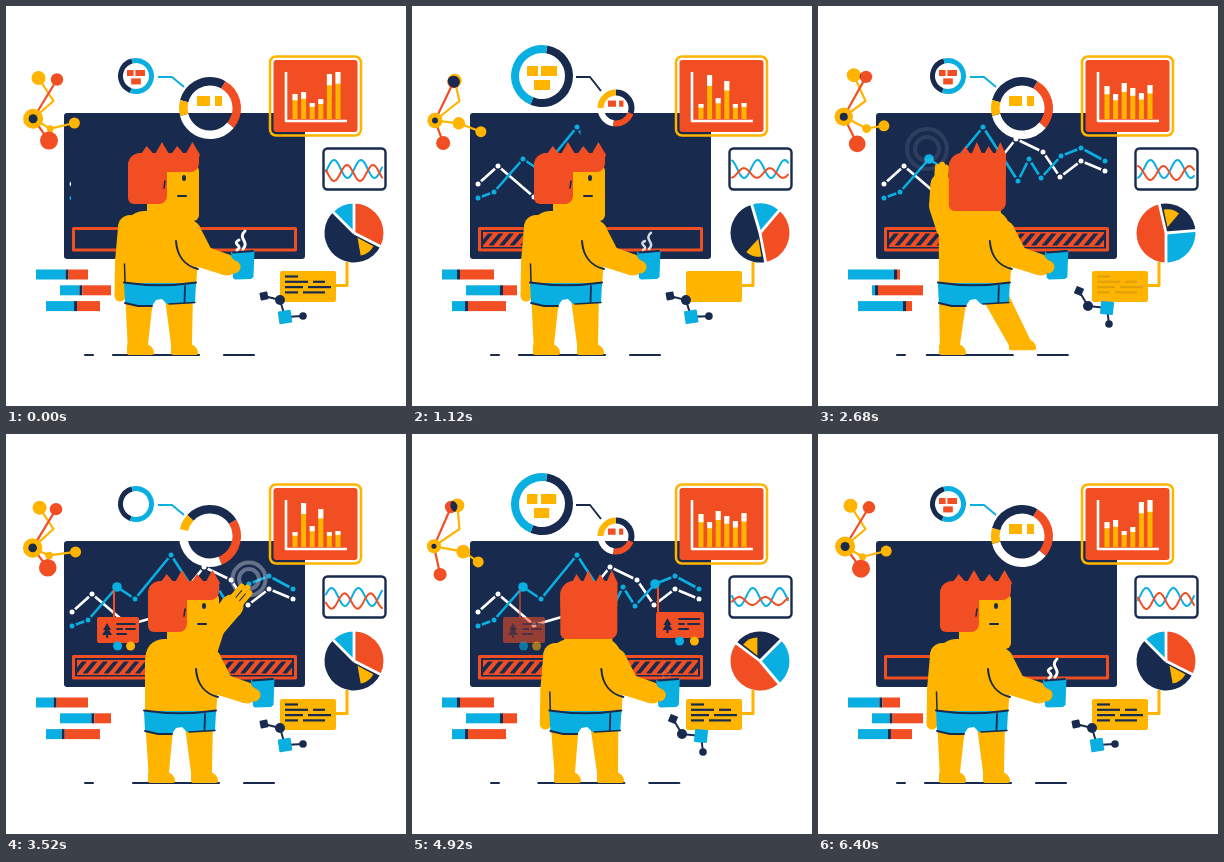
Write an HTML page with a canvas that moves like this. It is 400 by 400 pixels and loops after 6440 ms.

```html
<!DOCTYPE html>
<html lang="en">
<head>
<meta charset="utf-8">
<title>Dashboard</title>
<style>
html, body { margin: 0; width: 100%; height: 100%; overflow: hidden; background: #fff; }
canvas { display: block; width: 400px; height: 400px; }
</style>
</head>
<body>
<canvas id="stage"></canvas>
<script>
const LOOP = 6440, HALF = LOOP / 2, STEP = 40, TAU = Math.PI * 2;
const NAVY = '#182a4d', RED = '#f24e24', GOLD = '#ffb400', BLUE = '#0aafe2', WHITE = '#fff';
const canvas = document.getElementById('stage');
const dpr = window.devicePixelRatio || 1;
canvas.width = canvas.height = 400 * dpr;
const c = canvas.getContext('2d');

// ---------- timing ----------
const mix = (a, b, k) => a + (b - a) * k;
const mixAll = (a, b, k) => a.map((v, i) => Array.isArray(v) ? mixAll(v, b[i], k) : mix(v, b[i], k));
const unit = k => Math.max(0, Math.min(1, k));
const linear = (t, a, b) => unit((t - a) / (b - a));
// Eased 0 to 1 between times a and b.
const ramp = (t, a, b) => {
  const k = linear(t, a, b);
  return k * k * (3 - 2 * k);
};
const pulse = (t, a, b, d, e) => ramp(t, a, b) - ramp(t, d, e);
// Steps through states; each move is given by its start, its end and the state reached.
const moves = (t, first, list) =>
  list.reduce((state, [a, b, next]) => mixAll(state, next, ramp(t, a, b)), first);

// ---------- drawing ----------
function path(pts, close) {
  c.beginPath();
  pts.forEach(([x, y], i) => i ? c.lineTo(x, y) : c.moveTo(x, y));
  if (close) c.closePath();
}
function line(pts, color, width) {
  path(pts);
  c.strokeStyle = color;
  c.lineWidth = width;
  c.stroke();
}
function poly(pts, color) {
  path(pts, true);
  c.fillStyle = color;
  c.fill();
}
function rect(x, y, w, h, color) {
  c.fillStyle = color;
  c.fillRect(x, y, w, h);
}
function round(x, y, w, h, r, fill, stroke, width) {
  c.beginPath();
  c.roundRect(x, y, w, h, r);
  if (fill) { c.fillStyle = fill; c.fill(); }
  if (stroke) { c.strokeStyle = stroke; c.lineWidth = width; c.stroke(); }
}
function dot(x, y, r, color) {
  c.beginPath();
  c.arc(x, y, r, 0, TAU);
  c.fillStyle = color;
  c.fill();
}
function layer(alpha, draw) {
  if (alpha <= 0) return;
  c.save();
  c.globalAlpha *= alpha;
  draw();
  c.restore();
}
// Degrees run clockwise from the top.
const rad = deg => (deg - 90) * Math.PI / 180;
function arc(x, y, r, from, sweep, color, width) {
  c.beginPath();
  c.arc(x, y, r, rad(from), rad(from + sweep));
  c.strokeStyle = color;
  c.lineWidth = width;
  c.stroke();
}
function wedge(x, y, r, from, to, color) {
  c.beginPath();
  c.moveTo(x, y);
  c.arc(x, y, r, rad(from), rad(to));
  c.closePath();
  c.fillStyle = color;
  c.fill();
}
function limb(joints, color) {
  joints.forEach(([x, y, r], i) => {
    dot(x, y, r, color);
    if (!i) return;
    const [px, py, pr] = joints[i - 1];
    const d = Math.hypot(x - px, y - py) || 1;
    const nx = (py - y) / d, ny = (x - px) / d;
    poly([[px + nx * pr, py + ny * pr], [x + nx * r, y + ny * r],
      [x - nx * r, y - ny * r], [px - nx * pr, py - ny * pr]], color);
  });
}

// ---------- screen ----------
const blueLine = [[66, 192], [82, 186], [111, 153], [129, 165], [165, 121], [200, 175],
  [211, 153], [223, 172], [243, 150], [263, 142], [287, 155]];
const whiteLine = [[66, 178], [86, 160], [122, 191], [160, 180], [198, 133], [225, 146],
  [242, 171], [263, 155], [287, 165]];

function plot(pts, color) {
  line(pts, color, 2.6);
  for (const [x, y] of pts) {
    dot(x, y, 4.2, NAVY);
    dot(x, y, 2.5, color);
  }
}
function tip(x, y, left, top, w, alpha) {
  layer(alpha, () => {
    line([[x, y + 4], [x, top]], RED, 2);
    round(left, top, w, 26, 2, RED);
    dot(left + w * .49, top + 29, 4.5, BLUE);
    dot(left + w * .8, top + 29, 4.5, GOLD);
    const tx = left + w * .24, ty = top + 6;
    for (const i of [0, 1])
      poly([[tx, ty + 4 * i], [tx + 4 + i, ty + 7 + 5 * i], [tx - 4 - i, ty + 7 + 5 * i]], NAVY);
    rect(tx - 1, ty + 12, 2, 3, NAVY);
    const lx = left + w * .48, rx = left + w * .9;
    line([[lx, top + 7], [rx, top + 7]], NAVY, 2);
    line([[lx, top + 12], [lx + 5, top + 12]], NAVY, 2);
    line([[lx + 9, top + 12], [rx, top + 12]], NAVY, 2);
    line([[lx, top + 17], [lx + 9, top + 17]], NAVY, 2);
  });
}
function ripple(x, y, start, t) {
  const k = (t - start) / 340;
  if (k <= 0 || k >= 1) return;
  layer(.6 * (1 - k), () => {
    for (const r of [20, 12]) arc(x, y, r * Math.min(1, .65 + k * .5), 0, 360, '#dfe3ea', 4);
  });
}
function screen(t) {
  round(58, 107, 241, 146, 3, NAVY);
  c.strokeStyle = RED;
  c.lineWidth = 3;
  c.strokeRect(67.5, 222.5, 222, 21.5);

  c.save();
  c.beginPath();
  c.rect(71, 225, 215 * (linear(t, 480, 1780) - ramp(t, 5400, 5960)), 17);
  c.clip();
  rect(71, 226, 215, 15, RED);
  for (let x = 66; x < 290; x += 10.5)
    poly([[x, 239.5], [x + 5, 239.5], [x + 15, 227.5], [x + 10, 227.5]], NAVY);
  c.restore();

  layer(1 - ramp(t, 5400, 5800), () => {
    c.beginPath();
    c.rect(58, 107, 7 + 230 * linear(t, 580, 1780), 146);
    c.clip();
    plot(whiteLine, WHITE);
    plot(blueLine, BLUE);
    if (t > 2560) dot(111, 153, 4.8, BLUE);
    if (t > 3560) dot(243, 150, 4.8, BLUE);
  });
  tip(108, 153, 91, 183, 42, pulse(t, 2780, 2980, 4820, 5040));
  tip(246, 150, 244, 178, 48, pulse(t, 3640, 3860, 5280, 5500));
  ripple(109, 143, 2400, t);
  ripple(243, 145, 3400, t);
}

// ---------- widgets around the screen ----------
function ring(x, y, r, width, from, parts) {
  for (const [color, sweep] of parts) {
    arc(x, y, r - width / 2, from, sweep, color, width);
    from += sweep;
  }
}
function donuts(p) {
  const out = ramp(p, 420, 820), back = ramp(p, 2080, 2480), s = out - back;
  const show = 1 - pulse(p, 100, 280, 820, 1050) - pulse(p, 1660, 1960, 2440, 2640);
  const swap = (a, b) => mix(a, b, s);
  const navy = swap(145, 192);
  ring(130, 70, swap(18, 31), swap(5, 8), 200 + 170 * out + 190 * back, [[NAVY, navy], [BLUE, 360 - navy]]);
  ring(204, 102, swap(31, 18.5), swap(8.5, 6), 285 + 75 * ramp(p, 60, 640) + 285 * back,
    [[NAVY, swap(105, 110)], [RED, swap(100, 80)], [WHITE, swap(125, 80)], [GOLD, swap(30, 90)]]);
  line([[swap(152, 164), 71], [swap(166, 178), 71], [swap(178, 189), swap(81, 85)]], s > .5 ? NAVY : BLUE, 2);

  const block = (x, y, k, color, list) => {
    for (const [bx, by, w] of list) rect(x + bx * k, y + by * k, w * k * show, 10 * k, color);
  };
  block(130, 70, swap(.6, 1), s > .5 ? GOLD : RED, [[-15, -10, 11], [-1, -10, 16], [-8, 4, 16]]);
  block(204, 102, swap(1, .62), s > .5 ? RED : GOLD, [[-13, -12, 13], [5, -12, 7]]);
}
function barCard(t) {
  round(264, 50.5, 91, 79, 6, null, GOLD, 2.5);
  round(267.5, 54, 84, 72, 3, RED);
  line([[280, 66], [280, 115], [341, 115]], WHITE, 2.6);
  const rise = [25, 27, 16, 20, 45, 47], flat = [33, 25, 36, 31, 26, 34], peak = [15, 44, 21, 38, 15, 16];
  const bars = moves(t % (LOOP / 3), rise, [[120, 440, flat], [760, 1060, peak], [1480, 1880, rise]]);
  bars.forEach((h, i) => {
    const x = 286.5 + 8.6 * i;
    rect(x, 113 - h, 5, h, GOLD);
    rect(x, 113 - h, 5, h * .25, WHITE);
  });
}
function waveCard(p) {
  round(317.5, 142.5, 62, 41, 4, WHITE, NAVY, 2.4);
  const turn = p / HALF;
  const wave = (mid, amp, crest, len, color) => {
    const pts = [];
    for (let x = 320; x <= 376; x++)
      pts.push([x, mid - amp * Math.cos(TAU * ((x - crest) / len + turn))]);
    line(pts, color, 2);
  };
  wave(163, 9, 328, 27, BLUE);
  wave(167, 6 + 2 * Math.cos(TAU * turn), 341, 26, RED);
}
function pie(p) {
  const x = 348, y = 227;
  const grow = 50 * pulse(p, 900, 1600, 2680, 3140);
  const blue = -45 + 90 * ramp(p, 800, 1650) + 40 * ramp(p, 2080, 2680) + 230 * ramp(p, 2680, 3140);
  const red = blue + 45 + grow, navy = red + 117 + grow;
  wedge(x, y, 29.5, blue, red, BLUE);
  wedge(x, y, 29.5, red, navy, RED);
  wedge(x, y, 29.5, navy, blue + 360, NAVY);
  for (const a of [blue, red, navy])
    line([[x, y], [x + 31 * Math.cos(rad(a)), y + 31 * Math.sin(rad(a))]], WHITE, 2.8);
  const mid = navy + 27;
  wedge(x + 6 * Math.cos(rad(mid)), y + 6 * Math.sin(rad(mid)), 18, mid - 26, mid + 26, GOLD);
}
function note(p) {
  line([[341, 256], [341, 279.5], [329, 279.5]], GOLD, 3);
  round(274, 265, 56, 31, 2, GOLD);
  const q = p % (HALF / 2), typing = q > 1140;
  layer(typing ? 1 : 1 - ramp(q, 940, 1110), () => {
    for (let i = 0; i < 4; i++) {
      const k = typing ? unit((q - 1140) / 100 - i) : 1;
      if (!k) continue;
      const y = 270.5 + 5.3 * i, split = 292 + 5 * (i * 2 % 3);
      line([[279, y], [mix(279, split, k), y]], NAVY, 2.2);
      if (i) line([[split + 5, y], [mix(split + 5, 325 - 6 * (i % 2), k), y]], NAVY, 2.2);
    }
  });
}
function smallNet(p) {
  const k = pulse(p, 1080, 1600, 2680, 3120);
  const n = mixAll([[258, 290], [274, 294], [279, 311], [297, 310]], [[261, 285], [270, 300], [289, 302], [291, 318]], k);
  const box = ([x, y], size, color, angle) => {
    c.save();
    c.translate(x, y);
    c.rotate(angle);
    round(-size / 2, -size / 2, size, size, 1, color);
    c.restore();
  };
  line(n, NAVY, 2);
  box(n[0], 8, NAVY, mix(-.2, .4, k));
  dot(...n[1], 5, NAVY);
  box(n[2], 13, BLUE, mix(-.15, .1, k));
  dot(...n[3], 3.8, NAVY);
}
function bigNet(p) {
  const th = TAU * p / HALF, near = (1 + Math.cos(th)) / 2;
  const orbit = (x, y, rx, ry, lagX, lagY) => [x + rx * Math.cos(th - lagX), y + ry * Math.cos(th - lagY)];
  const quarter = TAU / 4;
  const a = orbit(39, 72, -6.5, 3.3, 0, quarter), b = orbit(45, 73.5, 6, 3, 0, quarter);
  const hub = orbit(24.5, 112.7, 2.6, 2.2, 0, quarter), low = orbit(35.5, 137.3, 7.5, -3.6, 0, .7);
  const mid = orbit(47.5, 120, -4.5, 3, .76, 5.8), end = orbit(67.5, 122.5, 2.5, -5.5, 1.2, 0);
  line([a, [47.5, 95], hub, mid, end], GOLD, 2.2);
  line([b, hub, low], RED, 2.2);
  dot(...a, 7, GOLD);
  dot(...b, 6.2, RED);
  // the overlap of the two top nodes turns dark
  c.save();
  c.beginPath();
  c.arc(...a, 7, 0, TAU);
  c.clip();
  dot(...b, 6.2, NAVY);
  c.restore();
  dot(...mid, mix(7, 3.5, near), GOLD);
  dot(...end, 5.5, GOLD);
  dot(...low, mix(6.5, 9, near), RED);
  dot(...hub, mix(7, 10, near), GOLD);
  dot(...hub, mix(2.5, 4.5, near), NAVY);
}
function splitBars(p) {
  const k = pulse((p + HALF - 1700) % HALF, 20, 320, 1000, 2000);
  // left, right, then the split at rest and when shifted
  [[30, 82, 45, 76], [54, 105, 88, 57], [40, 94, 53, 85]].forEach(([l, r, rest, far], i) => {
    const y = 263.5 + 15.8 * i, at = mix(rest, far, k);
    rect(l, y, at - l, 10, BLUE);
    rect(at, y, 3, 10, NAVY);
    rect(at + 3, y, r - at - 3, 10, RED);
  });
}

// ---------- person ----------
// side is 0 from behind and 1 in profile.
function hair(side) {
  const left = mix(-28, -35, side), right = mix(29, 36, side);
  round(left, -58, mix(29, 4, side) - left, mix(58, 51, side), [14, 4, 8, 6], RED);
  round(left, -58, right - left, mix(34, 19, side), [14, 3, 10, 8], RED);
  const step = (right - left - 10) / 4;
  for (let i = 0; i < 4; i++) {
    const x = left + 8 + step * i;
    poly([[x, -50], [x + step * .7, i % 2 ? -69 : -65], [x + step * 1.2, -56], [x + step, -50]], RED);
  }
}
function head(x, turn) {
  const side = Math.abs(turn);
  c.save();
  c.translate(x, 205);
  if (turn < 0) c.scale(-1, 1);
  round(mix(-24, -16, side), -46, mix(48, 52, side), 56, 6, GOLD);
  if (side > .4) {
    const shift = (side - 1) * 14;
    c.beginPath();
    c.ellipse(21 + shift, -33, 2, 3, 0, 0, TAU);
    c.fillStyle = NAVY;
    c.fill();
    line([[15 + shift, -15], [23 + shift, -15]], NAVY, 2);
  }
  hair(side);
  if (side > .8) line([[2, -30], [1, -23]], NAVY, 1.6);
  c.restore();
}

// shoulder x, hand x, hand y, elbow bend, raise
const armDown = [124, 114, 290, 2, 0], armFace = [126, 105, 175, 14, 1];
const armTouch = [128, 121, 178, 5, .8], armAcross = [178, 206, 172, 5, 1];

function freeArm(t) {
  const [sx, hx, hy, bend, raise] = moves(t, armDown,
    [[1360, 1720, armFace], [2320, 2520, armTouch], [2800, 3240, armAcross], [3840, 4160, armDown]]);
  const sy = 221, d = Math.hypot(hx - sx, hy - sy);
  const side = hy < sy ? 1 : -1;
  const ex = (sx + hx) / 2 + side * bend * (hy - sy) / d, ey = (sy + hy) / 2 - side * bend * (hx - sx) / d;
  limb([[sx, sy, 12], [ex, ey, mix(8, 11, raise)], [hx, hy, mix(5.5, 11.5, raise)]], GOLD);

  c.save();
  c.translate(hx, hy);
  c.rotate(Math.atan2(hy - ey, hx - ex));
  for (const y of [-5, 0, 5]) line([[0, y * raise], [(24 - Math.abs(y) * .6) * raise, y * raise]], GOLD, 6);
  if (raise > .9) for (const y of [-2.5, 2.5]) line([[9, y], [18, y]], NAVY, 1);
  c.restore();
  return raise;
}
function leg(hip, foot, lift) {
  const y = 349 - lift;
  poly([[hip - 14, 285], [hip + 15, 285], [foot + 9, y - 11], [foot + 9, y - 6], [foot - 11, y - 3]], GOLD);
  round(foot - 12, y - 11, 27, 11, [2, 9, 2, 2], GOLD);
}
function legs(t, dx) {
  const hop = (a, b) => 5 * Math.sin(Math.PI * linear(t, a, b));
  const left = 133 + 21 * pulse(t, 2760, 3080, 4960, 5240);
  const right = 177 + 26 * ramp(t, 2520, 2680) - 6 * ramp(t, 2800, 3200) - 20 * ramp(t, 5240, 5560);
  leg(133 + dx, left, hop(2760, 3080) + hop(4960, 5240));
  leg(172 + dx, right, hop(2520, 2800) + hop(5240, 5560));
}
function torso() {
  c.beginPath();
  c.moveTo(119, 281);
  c.lineTo(119, 226);
  c.quadraticCurveTo(120, 206, 138, 205);
  c.lineTo(178, 205);
  c.quadraticCurveTo(192, 212, 193, 236);
  c.lineTo(190, 281);
  c.closePath();
  c.fillStyle = GOLD;
  c.fill();
}
function mugArm(t) {
  limb([[183, 226, 12], [197, 251, 11], [221, 259, 10.5]], GOLD);
  c.beginPath();
  c.moveTo(170, 235);
  c.bezierCurveTo(171, 250, 179, 260, 192, 263);
  c.strokeStyle = NAVY;
  c.lineWidth = 2;
  c.stroke();
  poly([[225, 246], [248.5, 244], [247.5, 271], [245, 273], [229, 273.5], [227, 272]], BLUE);
  line([[227, 246.5], [247, 245]], NAVY, 1.8);
  limb([[219, 259, 10], [228, 261, 6.5]], GOLD);
  const steam = 1 - pulse(t, 600, 2600, 4400, 5900);
  layer(steam, () => {
    c.strokeStyle = WHITE;
    c.lineWidth = 3 * steam;
    for (const i of [0, 1]) {
      const x = 231 + 6 * i, y = 244 - i, h = (10 + 8 * i) * mix(.4, 1, steam);
      c.beginPath();
      c.moveTo(x, y);
      c.bezierCurveTo(x + 7, y - h * .4, x - 6, y - h * .6, x + 2, y - h);
      c.stroke();
    }
  });
}
function shorts() {
  poly([[118, 277], [190, 277], [189, 297], [161, 298], [156, 293], [150, 294], [146, 300], [132, 300], [119, 297]], BLUE);
  c.beginPath();
  c.moveTo(118, 276.5);
  c.quadraticCurveTo(154, 282, 190, 276.5);
  c.strokeStyle = NAVY;
  c.lineWidth = 2;
  c.stroke();
  line([[119, 297], [132, 300], [146, 300]], NAVY, 1.8);
  line([[163, 298], [189, 296.5]], NAVY, 1.5);
  line([[179, 280], [178.5, 296]], NAVY, 1.8);
}
function person(t) {
  const dx = 20 * pulse(t, 2560, 3200, 4840, 5560);
  const turn = 1 - 2 * ramp(t, 1360, 1720) + ramp(t, 2320, 2520)
    + pulse(t, 2880, 3160, 4520, 4760) + ramp(t, 5400, 5760);
  line([[79, 349], [87, 349]], NAVY, 2);
  line([[107 + dx, 349], [193 + dx, 349]], NAVY, 2.2);
  line([[218 + dx, 349], [248 + dx, 349]], NAVY, 2.2);
  legs(t, dx);

  c.save();
  c.translate(dx, 0);
  const raise = freeArm(t);
  torso();
  if (raise < .1) line([[118.5, 258], [119, 276]], NAVY, 1.5);
  mugArm(t);
  shorts();
  head(157 - 3 * pulse(t, 1360, 1720, 2320, 2520), turn);
  c.restore();
}

// ---------- loop ----------
const begin = performance.now();
function frame(now) {
  const t = Math.floor(Math.max(0, now - begin) % LOOP / STEP) * STEP, p = t % HALF;
  c.setTransform(dpr, 0, 0, dpr, 0, 0);
  c.lineCap = c.lineJoin = 'round';
  rect(0, 0, 400, 400, WHITE);
  screen(t);
  c.lineCap = 'butt';
  donuts(p);
  barCard(t);
  pie(p);
  note(p);
  splitBars(p);
  c.lineCap = 'round';
  waveCard(p);
  smallNet(p);
  bigNet(p);
  person(t);
  requestAnimationFrame(frame);
}
frame(begin);
</script>
</body>
</html>
```
